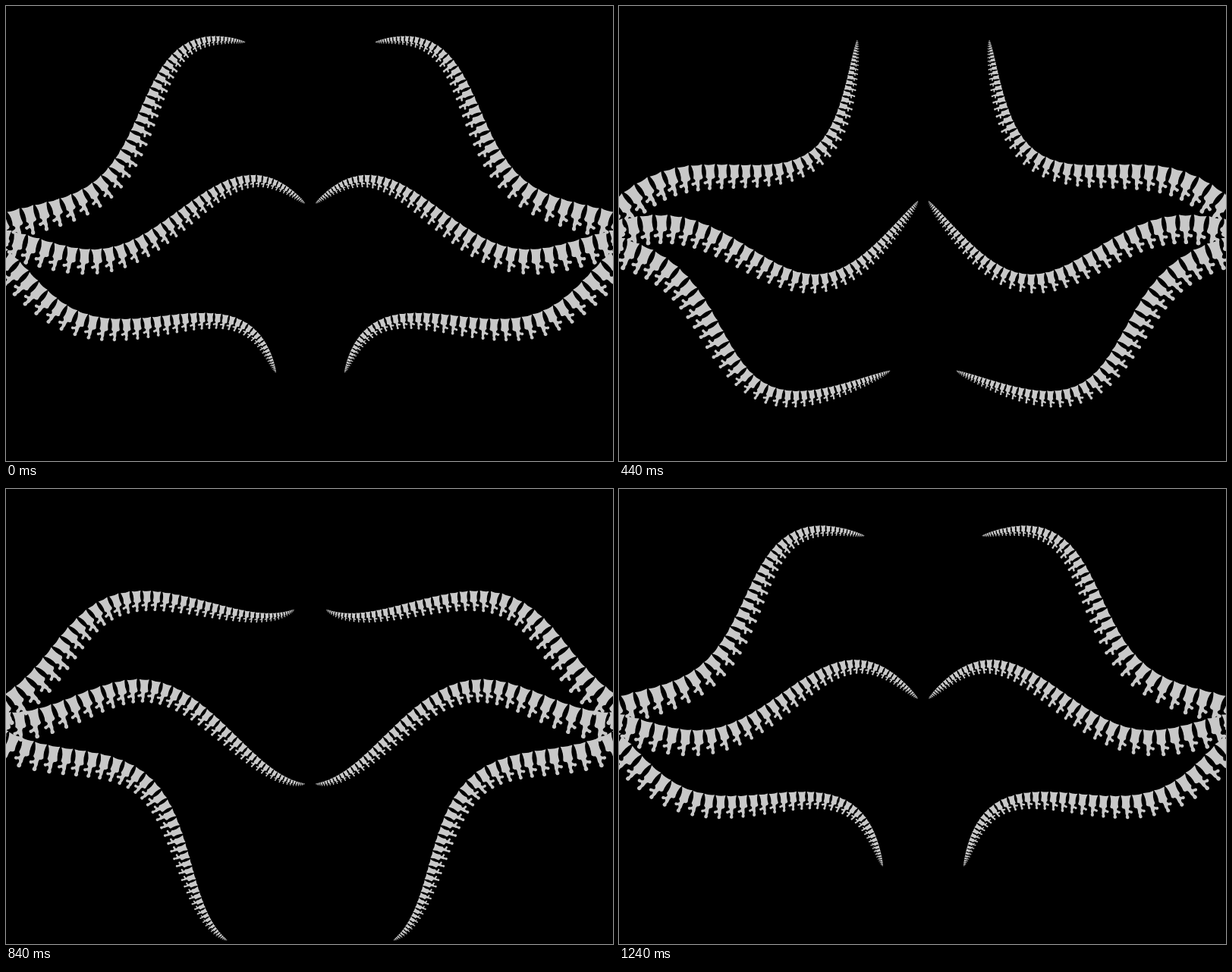
An HTML page that plays this animation: 800 by 600 pixels, repeating every 1.28 s.

```html
<!DOCTYPE html>
<html lang="en">
<head>
<meta charset="utf-8">
<title>Spines</title>
<style>
  html, body { margin: 0; width: 100%; height: 100%; overflow: hidden; background: #000; }
  svg { display: block; width: 100%; height: 100%; }
</style>
</head>
<body>
<svg id="stage" viewBox="0 0 800 600">
  <defs>
    <path id="bone" d="M-.45 -.5 Q0 -.4 .43 -.52 Q.27 0 .4 .52 Q.34 .66 .16 .66
      Q.08 .76 .1 .9 Q.13 1.08 .06 1.26 Q.14 1.42 .04 1.52 Q-.1 1.6 -.2 1.48
      Q-.24 1.36 -.15 1.24 Q-.12 1.1 -.2 1.02 Q-.28 1 -.36 1.08 Q-.5 1.12 -.54 .98
      Q-.54 .84 -.4 .85 Q-.22 .84 -.2 .7 Q-.24 .6 -.34 .52 Q-.22 0 -.45 -.5Z"/>
    <g id="arm"></g>
    <g id="side">
      <use href="#arm" transform="translate(-42 300.5) rotate(-30)"/>
      <use href="#arm" transform="translate(-42 300.5)"/>
      <use href="#arm" transform="translate(-42 300.5) rotate(30)"/>
    </g>
  </defs>
  <rect width="800" height="600" fill="#000"/>
  <g fill="#c8c8c8">
    <use href="#side"/>
    <use href="#side" transform="translate(802 0) scale(-1 1)"/>
  </g>
</svg>
<script>
const LOOP = 1280, STEP = 40;
const REACH = 436, COUNT = 47, SWING = 0.204;
const RAD = Math.PI / 180;
const NS = 'http://www.w3.org/2000/svg';

const arm = document.getElementById('arm');
const bones = Array.from({ length: COUNT }, () => {
  const bone = document.createElementNS(NS, 'use');
  bone.setAttribute('href', '#bone');
  return arm.appendChild(bone);
});

// Travelling wave whose height grows with the distance from the root.
function wave(x, t) {
  const lag = 63 - 0.77 * (REACH - x);
  return -SWING * x * Math.cos((360 * t / LOOP - lag) * RAD);
}

// Points along the arm with their running length.
function trace(t) {
  const points = [{ x: 0, y: 0, s: 0 }];
  for (let x = 2; x <= REACH; x += 2) {
    const last = points[points.length - 1];
    const y = wave(x, t);
    points.push({ x, y, s: last.s + Math.hypot(2, y - last.y) });
  }
  return points;
}

function draw(t) {
  const points = trace(t);
  const length = points[points.length - 1].s;
  let k = 1;
  bones.forEach((bone, i) => {
    const rest = 1 - i / COUNT;
    const s = length * (1 - rest * rest);
    while (k < points.length - 1 && points[k].s < s) k++;
    const a = points[k - 1], b = points[k];
    const f = (s - a.s) / (b.s - a.s);
    const x = a.x + (b.x - a.x) * f;
    const y = a.y + (b.y - a.y) * f;
    const angle = Math.atan2(wave(x + 1, t) - wave(x - 1, t), 2) / RAD;
    const size = 2 * length / COUNT * rest;
    bone.setAttribute('transform',
      `translate(${x.toFixed(2)} ${y.toFixed(2)}) rotate(${angle.toFixed(2)}) scale(${size.toFixed(3)})`);
  });
}

const start = performance.now();
function tick() {
  const t = (performance.now() - start) % LOOP;
  draw(Math.floor(t / STEP) * STEP);
  requestAnimationFrame(tick);
}
tick();
</script>
</body>
</html>
```
